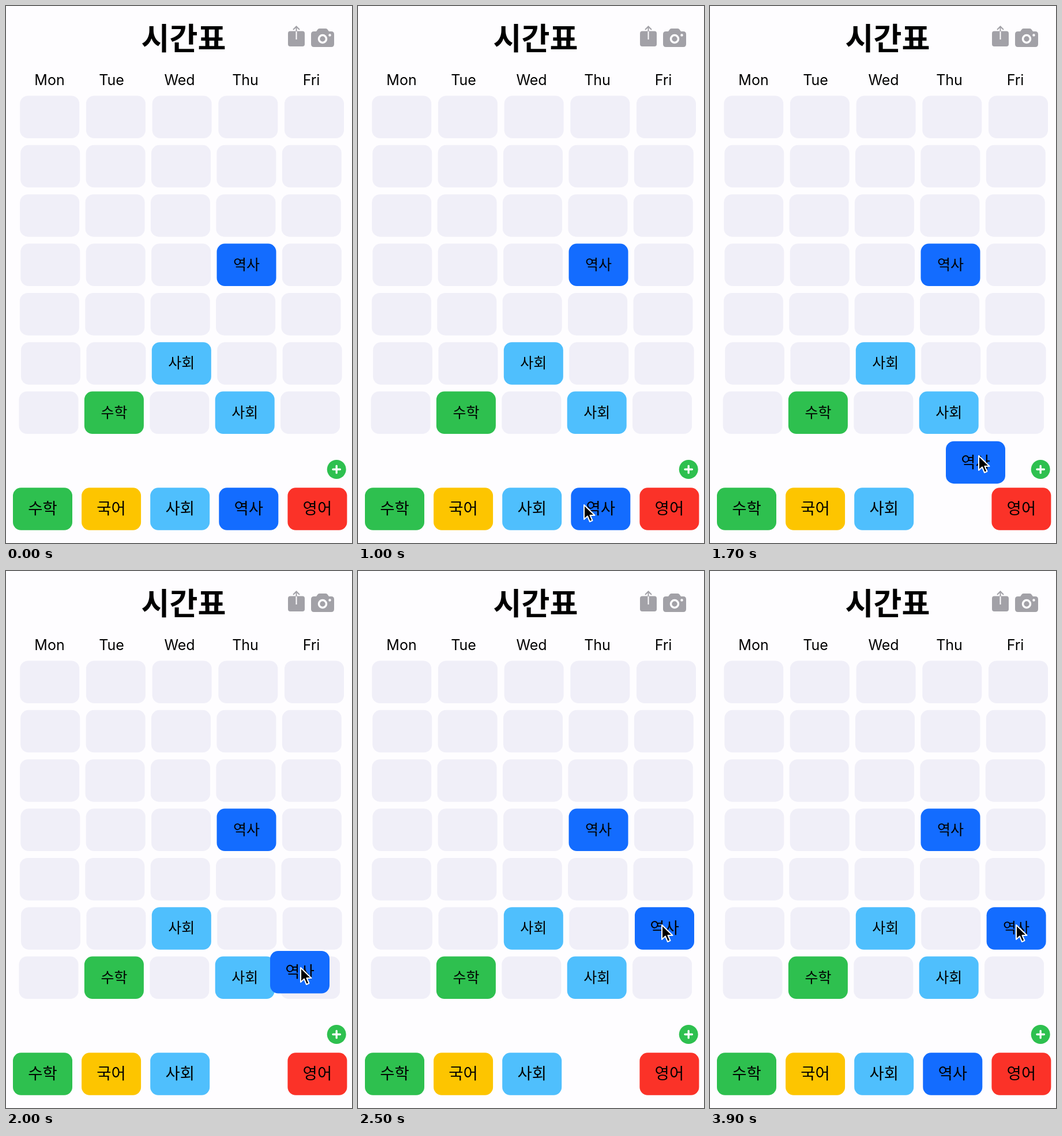
Animation of 600 by 930 pixels, one loop 4000 ms. Source, as an HTML page:

```html
<!DOCTYPE html>
<html lang="ko">
<head>
<meta charset="utf-8">
<title>시간표</title>
<style>
  html, body { margin: 0; height: 100%; overflow: hidden; background: #fefdff; }
  svg { display: block; }
  text { font-family: "Noto Sans CJK KR", "Noto Sans CJK", sans-serif; text-anchor: middle; }
  .day { font: 25px Inter, sans-serif; }
  .title { font-size: 53.2px; font-weight: 700; }
</style>
</head>
<body>
<svg width="600" height="930" viewBox="0 0 600 930">
  <text class="title" x="308" y="75.5">시간표</text>
  <g fill="#a2a1a7">
    <rect x="489" y="43.5" width="29" height="26.5" rx="4"/>
    <path d="M498 41l5.5-5.5 5.5 5.5M503.5 36v8" fill="none" stroke="#a2a1a7" stroke-width="2"/>
    <path d="M503.5 44v14" stroke="#fefdff" stroke-width="2"/>
    <path d="M534 44h4l3-4q1-1 3-1h10q2 0 3 1l3 4h4q5 0 5 5v17q0 5-5 5h-30q-5 0-5-5v-17q0-5 5-5z"/>
    <circle cx="549" cy="57" r="6.5" stroke="#fefdff" stroke-width="3.5"/>
    <circle cx="561.5" cy="50.5" r="2.2" fill="#fefdff"/>
  </g>
  <g id="grid"></g>
  <circle cx="573.2" cy="802.5" r="16.5" fill="#2ec04f"/>
  <path d="M567 802.5h12.4M573.2 796.3v12.4" stroke="#fff" stroke-width="3.3" stroke-linecap="round"/>
  <g id="tray"></g>
  <g id="drag"></g>
  <path id="cursor" d="M0 0V25L6 19.5L10 29L14.5 27L10.5 18H18.5Z" stroke="#fff" stroke-width="2" stroke-linejoin="round"/>
</svg>
<script>
const $ = id => document.getElementById(id);
const COLORS = { 수학: '#2ec04f', 국어: '#fdc500', 사회: '#4fbffd', 역사: '#136cff', 영어: '#fb3228' };
const DAYS = { Mon: 75.5, Tue: 183, Wed: 301, Thu: 415, Fri: 529.5 };
const LESSONS = { '3,3': '역사', '5,2': '사회', '6,1': '수학', '6,3': '사회' };
const LOOP = 4000, STEP = 100, APPEAR = 800, GRAB = 1300, SNAP = 2350, DROP = 2700;

function add(parent, tag, attrs, content = '') {
  const el = document.createElementNS('http://www.w3.org/2000/svg', tag);
  for (const key in attrs) el.setAttribute(key, attrs[key]);
  el.textContent = content;
  return parent.appendChild(el);
}

function card(parent, x, y, subject, size) {
  const g = add(parent, 'g', {});
  add(g, 'rect', { x, y, width: 103, height: 73.5, rx: 14, fill: COLORS[subject] || '#f0eff8' });
  if (subject) add(g, 'text', { x: x + 51.5, y: y + 35.6 + size * 0.385, 'font-size': size }, subject);
  return g;
}

// Rows sway left and right of the margin, more so towards the bottom
function cell(row, col, subject) {
  const sway = (row % 2 ? 1 : -1) * (0.5 + 1.7 * (row / 6) ** 4);
  const pitch = row ? 113.4 : 114.7;
  return card($('grid'), 24.7 + sway + col * pitch, 155.5 + row * 85.35, subject, 25);
}

for (const day in DAYS) add($('grid'), 'text', { class: 'day', x: DAYS[day], y: 137 }, day);
for (let row = 0; row < 7; row++)
  for (let col = 0; col < 5; col++) cell(row, col, LESSONS[[row, col]]);
const dropped = cell(5, 4, '역사');

const tray = Object.keys(COLORS).map((subject, i) =>
  card($('tray'), 12 + 119.1 * i, 834.3, subject, 27.5));
const home = tray[3];
card($('drag'), 0, 0, '역사', 27.5);

// Key points: time, x, y
const cursorPath = [[1000, 392, 864], [GRAB, 425, 860], [1700, 466, 779], [2000, 511, 687],
  [SNAP, 527, 613], [3300, 527, 613], [3700, 531, 613]];
const dragPath = [[GRAB, 369, 834.3], [1700, 409, 753.7], [2000, 458, 658], [SNAP, 480, 582.3]];

function along(path, t) {
  const next = path.findIndex(p => p[0] > t);
  if (next < 1) return path.at(next).slice(1);
  const [t0, x0, y0] = path[next - 1], [t1, x1, y1] = path[next];
  const k = (t - t0) / (t1 - t0);
  return [x0 + (x1 - x0) * k, y0 + (y1 - y0) * k];
}

const place = (el, path, t) => el.setAttribute('transform', `translate(${along(path, t)})`);
const show = (el, on) => el.setAttribute('visibility', on ? 'visible' : 'hidden');

function draw(now) {
  const t = Math.floor(now % LOOP / STEP) * STEP;
  const dragging = t >= GRAB && t < DROP;
  show($('cursor'), t >= APPEAR);
  show($('drag'), dragging);
  show(home, !dragging);
  show(dropped, t >= DROP);
  place($('cursor'), cursorPath, t);
  place($('drag'), dragPath, t);
}

const start = performance.now();
function tick() {
  draw(performance.now() - start);
  requestAnimationFrame(tick);
}
tick();
</script>
</body>
</html>
```
